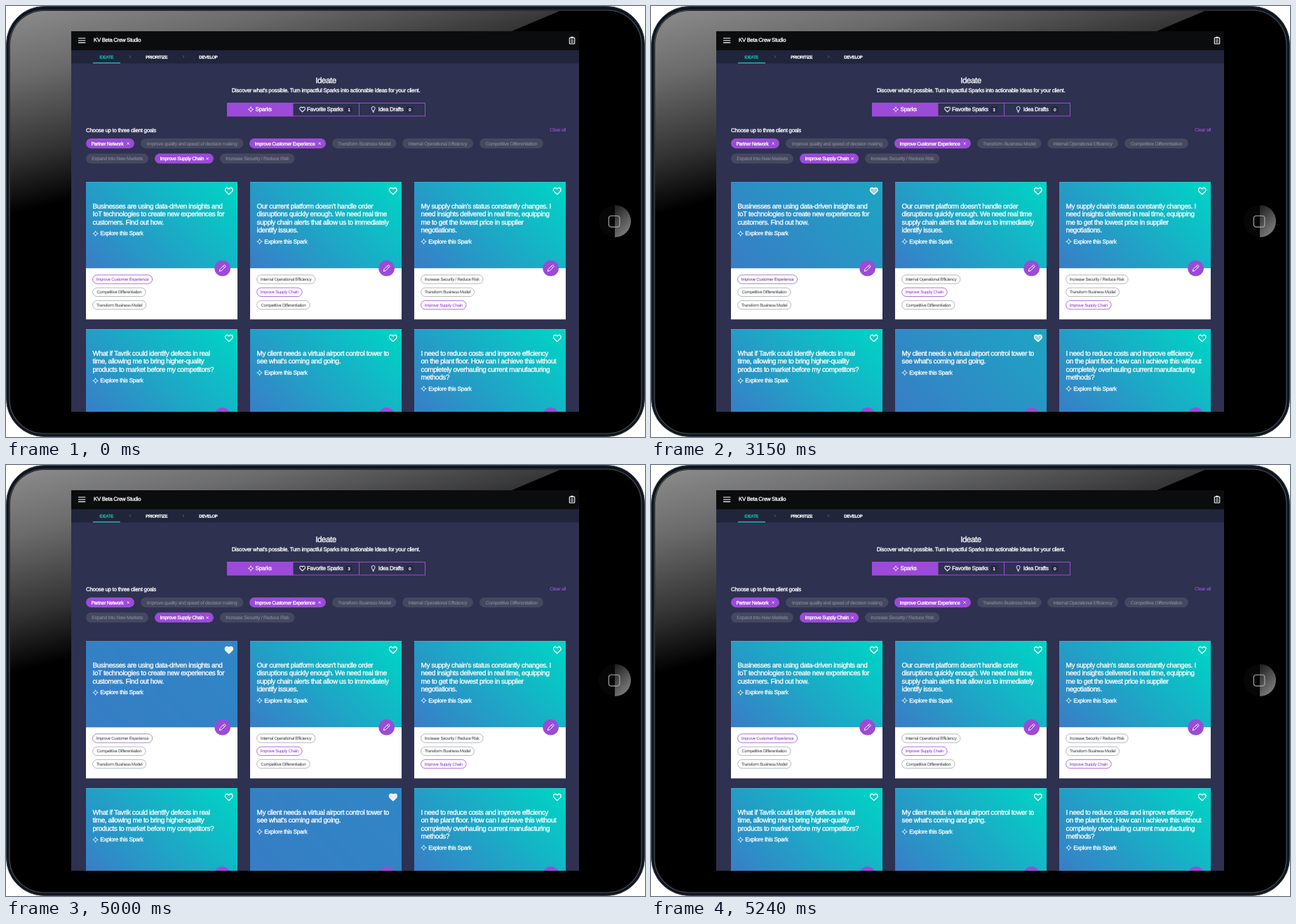
Animation of 911x615 px, one loop 5270 ms. Source, as an HTML page:

```html
<!DOCTYPE html>
<html lang="en">
<head>
<meta charset="utf-8">
<title>Ideate</title>
<style>
  html, body { margin: 0; width: 100%; height: 100%; overflow: hidden; background: #fff; }
  svg { display: block; width: 911px; height: 615px; }
  text {
    font-family: "Liberation Sans", Arial, sans-serif;
    letter-spacing: -.04em;
    text-rendering: geometricPrecision;
    white-space: pre;
  }
  .liked { opacity: 0; }
</style>
</head>
<body>
<svg id="stage" viewBox="0 0 911 615"></svg>
<script>
const PURPLE = '#9b4bd7', BLUE = '#377dc5', TEAL = '#00d3c5', GREY = '#55575c';
const CARD_W = 216, CARD_H = 196, FACE_H = 123;

const text = (x, y, label, size, { fill = '#fff', weight = .3, anchor = 'start' } = {}) =>
  `<text x="${x}" y="${y}" font-size="${size}" fill="${fill}" stroke="${fill}" stroke-width="${weight}" text-anchor="${anchor}">${label}</text>`;
const rect = (x, y, w, h, fill, extra = '') =>
  `<rect x="${x}" y="${y}" width="${w}" height="${h}" fill="${fill}" ${extra}/>`;
const path = (d, stroke = '#fff', width = 1, fill = 'none') =>
  `<path d="${d}" fill="${fill}" stroke="${stroke}" stroke-width="${width}" stroke-linejoin="round"/>`;
const at = (x, y, content, scale = 1) =>
  `<g transform="translate(${x} ${y}) scale(${scale})">${content}</g>`;
const liked = content => `<g class="liked">${content}</g>`;

const HEART = 'M0 4.9L-4.5 .5C-6.1-1.4-5.3-4.5-2.7-4.5C-1.4-4.5-.5-3.7 0-2.8C.5-3.7 1.4-4.5 2.7-4.5C5.3-4.5 6.1-1.4 4.5 .5Z';
const spark = (x, y) => at(x, y,
  path('M0-4V-2.2M0 2.2V4M-4 0H-2.2M2.2 0H4', '#fff', .9) +
  path('M0-2.4L1.6-1.6L2.4 0L1.6 1.6L0 2.4L-1.6 1.6L-2.4 0L-1.6-1.6Z', '#fff', .75));
const bulb = (x, y) => at(x, y,
  path('M-1.1 1.8C-1.1.6-2.5 0-2.5-1.6A2.5 2.5 0 0 1 2.5-1.6C2.5 0 1.1.6 1.1 1.8ZM-1.1 3.1H1.1M-.6 4.1H.6', '#fff', .9));
const pencil = (x, y) => at(x, y, `<circle r="11.3" fill="${PURPLE}"/>` +
  path('M-4.3 4.3l.8-3L2-4.2a1 1 0 0 1 1.5 0l.7.7a1 1 0 0 1 0 1.5L-1.3 3.5ZM.8-3l2.2 2.2', '#fff', .95));
const badge = (x, digit) =>
  rect(x - 5, 143, 10, 9.4, '#262944', 'rx="2.5"') +
  text(x, 149.8, digit, 5.8, { anchor: 'middle' });

function tag(y, [label, width], active) {
  const color = active ? PURPLE : GREY;
  return rect(9.6, y - 6.2, width, 12.4, '#fff',
      `rx="6.2" stroke="${active ? PURPLE : '#a3a5a8'}" stroke-width=".8"`) +
    text(9.6 + width / 2, y + 2.1, label, 6, { fill: color, anchor: 'middle', weight: .08 });
}

function card({ x, y, lines, tags = [], active = -1, like }) {
  const exploreY = 39 + lines.length * 11.4;
  const face = fill => rect(0, 0, CARD_W, FACE_H, fill);
  return at(x, y,
    rect(0, 0, CARD_W, CARD_H, '#fff') + face('url(#face)') +
    (like ? liked(face(BLUE)) : '') +
    at(203.8, 12.8, path(HEART, '#fff', 1.3) + (like ? liked(path(HEART, '#fff', 1.3, '#fff')) : '')) +
    lines.map((line, i) => text(9.6, 37.8 + i * 11.4, line, 9.95)).join('') +
    spark(13.6, exploreY + .3) + text(20.2, exploreY + 2.8, 'Explore this Spark', 8.3) +
    tags.map((t, i) => {
      const tagY = 138.8 + i * 18.3, on = i === active;
      return tag(tagY, t, on) + (on && like ? liked(tag(tagY, t, false)) : '');
    }).join('') +
    pencil(194.6, 123));
}

function chip([x, y, w, label, active]) {
  const fill = active ? '#fff' : '#85889b';
  return rect(x, y, w, 14.2, active ? PURPLE : '#45485f', 'rx="7.1"') +
    (active
      ? text(x + 7.4, y + 9.5, label, 6.95) +
        at(x + w - 8.8, y + 7.2, path('M-1.6-1.6L1.6 1.6M1.6-1.6L-1.6 1.6', '#fff', .8))
      : text(x + w / 2, y + 9.5, label, 6.95, { fill, anchor: 'middle', weight: .12 }));
}

const CUSTOMER = ['Improve Customer Experience', 85];
const COMPETE = ['Competitive Differentiation', 75.5];
const MODEL = ['Transform Business Model', 76];
const EFFICIENCY = ['Internal Operational Efficiency', 83.3];
const SUPPLY = ['Improve Supply Chain', 64.5];
const SECURITY = ['Increase Security / Reduce Risk', 88.5];

const chips = [
  [114, 189, 69, 'Partner Network', true],
  [192, 189, 146.5, 'Improve quality and speed of decision making'],
  [347, 189, 109, CUSTOMER[0], true],
  [465, 189, 91.5, MODEL[0]],
  [565, 189, 101, EFFICIENCY[0]],
  [675, 189, 91, COMPETE[0]],
  [114, 210.6, 89, 'Expand into New Markets'],
  [212, 210.6, 84, SUPPLY[0], true],
  [305, 210.6, 106.5, SECURITY[0]],
];

const cards = [
  { lines: ['Businesses are using data-driven insights and', 'IoT technologies to create new experiences for', 'customers. Find out how.'],
    tags: [CUSTOMER, COMPETE, MODEL], active: 0, like: true },
  { lines: ["Our current platform doesn't handle order", 'disruptions quickly enough. We need real time', 'supply chain alerts that allow us to immediately', 'identify issues.'],
    tags: [EFFICIENCY, SUPPLY, COMPETE], active: 1 },
  { lines: ['My supply chain’s status constantly changes. I', 'need insights delivered in real time, equipping', 'me to get the lowest price in supplier', 'negotiations.'],
    tags: [SECURITY, MODEL, SUPPLY], active: 2 },
  { lines: ['What if Tavrik could identify defects in real', 'time, allowing me to bring higher-quality', 'products to market before my competitors?'] },
  { lines: ['My client needs a virtual airport control tower to', "see what's coming and going."], like: true },
  { lines: ['I need to reduce costs and improve efficiency', 'on the plant floor. How can I achieve this without', 'completely overhauling current manufacturing', 'methods?'] },
].map((c, i) => ({ ...c, x: 114 + 234 * (i % 3), y: 251.2 + 210 * Math.floor(i / 3) }));

const defs = `<defs>
  <linearGradient id="face" gradientUnits="userSpaceOnUse" x1="23.25" y1="146.25" x2="192.75" y2="-23.25">
    <stop stop-color="#3a7cc7"/><stop offset=".96" stop-color="${TEAL}"/>
  </linearGradient>
  <linearGradient id="sheen" gradientUnits="userSpaceOnUse" x1="0" y1="0" x2="71" y2="282">
    <stop stop-color="#fff" stop-opacity=".56"/><stop offset=".35" stop-color="#fff" stop-opacity=".42"/>
    <stop offset=".73" stop-color="#fff" stop-opacity=".2"/><stop offset="1" stop-color="#fff" stop-opacity="0"/>
  </linearGradient>
  <linearGradient id="button" x1="0" y1="0" x2=".5" y2="1">
    <stop stop-color="#1c1c1c"/><stop offset="1" stop-color="#7c7c7c"/>
  </linearGradient>
  <clipPath id="screen"><rect x="93" y="36" width="724" height="543"/></clipPath>
  <clipPath id="glass"><rect x="6" y="7" width="899" height="602" rx="48"/></clipPath>
</defs>`;

const device =
  rect(.5, .5, 910, 614, '#10151c', 'rx="54" stroke="#39424d"') +
  rect(5, 6, 901, 604, '#000', 'rx="49" stroke="#46505c" stroke-width="1.2"') +
  '<path d="M0 0H806L0 342Z" fill="url(#sheen)" clip-path="url(#glass)"/>' +
  '<circle cx="867.5" cy="307" r="22.5" fill="#060606"/>' +
  '<path d="M868 284A23 23 0 0 1 868 330Z" fill="url(#button)"/>' +
  rect(859.3, 299.5, 15.6, 15.8, 'none', 'rx="3.5" stroke="#a5a5a5" stroke-width="1.2"');

const header =
  rect(93, 36, 724, 27.5, '#0b0c0e') +
  path('M103 46H113.3M103 49.2H113.3M103 52.4H113.3', '#fff', 1.1) +
  text(125, 51.2, 'KV Beta Crew Studio', 7.8) +
  rect(803.3, 45.2, 7.4, 8.8, 'none', 'rx=".8" stroke="#fff" stroke-width="1.1"') +
  rect(805.2, 43.8, 3.6, 2.4, '#fff') +
  path('M805 48.2H809M805 50.1H809M805 52H809', '#fff', .8) +
  rect(93, 63.5, 724, 18.5, '#20253c') +
  text(133.3, 74.6, 'IDEATE', 6, { fill: '#19bfb0' }) +
  rect(124, 80.6, 39, 1.4, '#19bfb0') +
  [176, 252].map(x => path(`M${x} 70.6l1.7 1.8l-1.7 1.8`, '#6d7186', .8)).join('') +
  text(199.3, 74.6, 'PRIORITIZE', 5.95, { weight: .4 }) +
  text(275.3, 74.6, 'DEVELOP', 5.9, { weight: .4 });

const intro =
  text(456, 109.5, 'Ideate', 11.6, { anchor: 'middle' }) +
  text(456, 122.5, "Discover what's possible. Turn impactful Sparks into actionable Ideas for your client.", 7.98, { anchor: 'middle' }) +
  rect(315.5, 138.5, 282, 18.5, 'none', `stroke="${PURPLE}" stroke-width="1"`) +
  rect(315, 138, 94.5, 19.4, PURPLE) +
  path('M503.5 139V157', PURPLE, 1) +
  spark(349, 147.6) + text(355.6, 150.3, 'Sparks', 8.1) +
  at(422.6, 147.6, path(HEART, '#fff', 1.4), .72) + text(429, 150.3, 'Favorite Sparks', 8.1) +
  badge(489, 1) + liked(badge(489, 3)) +
  bulb(523.6, 147.6) + text(530.8, 150.3, 'Idea Drafts', 8.05) + badge(575.8, 0) +
  text(114, 180.1, 'Choose up to three client goals', 7.98) +
  text(798, 179.4, 'Clear all', 6.85, { fill: '#a24fe0', anchor: 'end', weight: .1 });

const stage = document.getElementById('stage');
stage.innerHTML = defs + device +
  `<g clip-path="url(#screen)">${rect(93, 36, 724, 543, '#2e3150')}${header}${intro}${
    chips.map(chip).join('')}${cards.map(card).join('')}</g>`;

// Likes fade in over 11 steps of 30 ms and back out over 9.
const LOOP = 5270;
const fade = [
  [0, 0, 'linear'],
  [3000, 0, 'steps(11, start)'],
  [3330, 1, 'linear'],
  [5000, 1, 'steps(9, start)'],
  [LOOP, 0, 'linear'],
].map(([time, opacity, easing]) => ({ offset: time / LOOP, opacity, easing }));

for (const el of stage.querySelectorAll('.liked'))
  el.animate(fade, { duration: LOOP, iterations: Infinity });
</script>
</body>
</html>
```
